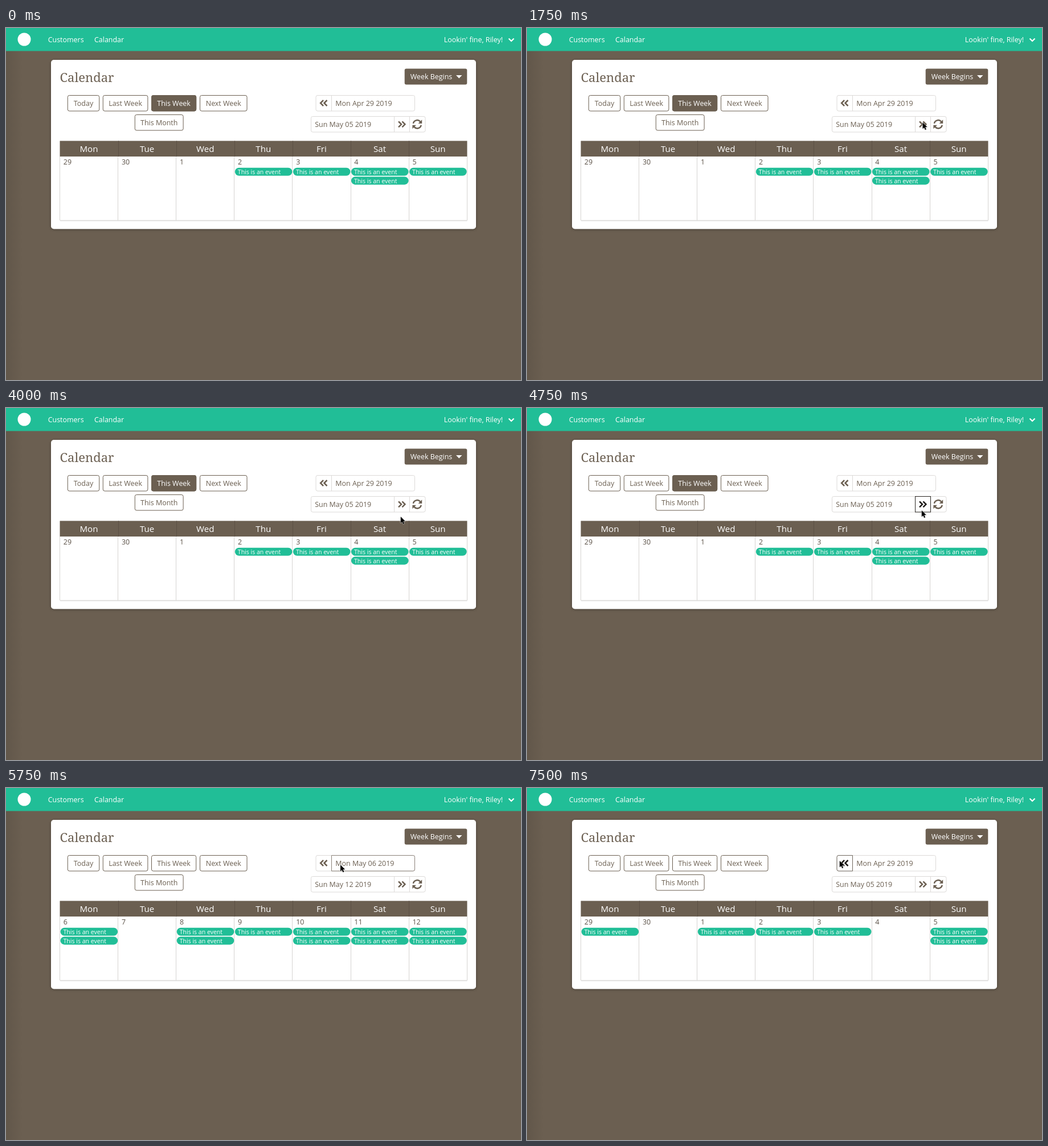
These frames come from a looping animation (904x619 px, 8 s). An HTML page:

```html
<!DOCTYPE html>
<html lang="en">
<head>
<meta charset="utf-8">
<title>Calendar</title>
<style>
  :root { --brown: #6b5f51; --teal: #21be97; }
  html, body { margin: 0; width: 904px; height: 619px; overflow: hidden; background: var(--brown); }
  svg { display: block; font: 12.45px "Open Sans", "Noto Sans", sans-serif; }
  .white { fill: #fff; }
  .ink { fill: var(--brown); }
  .mid { text-anchor: middle; }
  .title { font: 300 22px "Noto Serif", serif; }
  .head { font-size: 15.1px; }
  .event { font-size: 10.55px; fill: #fff; }
  .day { fill: #5b5147; }
  .button { fill: #fff; stroke: var(--brown); }
  .field { fill: #fff; stroke: #dcdad8; }
  .line { fill: none; stroke: #d6d4d2; }
  .icon { fill: none; stroke: var(--brown); stroke-width: 2.5; }
  .hover { fill: none; stroke: #8a8178; }
  .dark { fill: #fff; stroke: #6f675e; }
  .dark + .icon { stroke: #1d1a17; }
  .card { filter: drop-shadow(0 1px 2px rgba(0, 0, 0, .35)); }

  .anim { animation: 8s step-end infinite; opacity: 0; }
  #weekA { animation-name: first; }
  #weekB { animation-name: second; }
  #weekC { animation-name: third; }
  #nextHover { animation-name: nextHover; }
  #nextFocus { animation-name: nextFocus; }
  #inputHover { animation-name: inputHover; }
  #prevHover { animation-name: prevHover; }
  #cursor { animation-name: cursor; }
  #nextFocus .dark { stroke: #2a2622; }

  @keyframes first { 0% { opacity: 1 } 62.5%, 100% { opacity: 0 } }
  @keyframes second { 0% { opacity: 0 } 62.5% { opacity: 1 } 90.625%, 100% { opacity: 0 } }
  @keyframes third { 0% { opacity: 0 } 90.625%, 100% { opacity: 1 } }
  @keyframes nextHover {
    0%, 50% { opacity: 0 }
    46.875%, 53.125% { opacity: 1 }
    59.375%, 100% { opacity: 0 }
  }
  @keyframes nextFocus { 0% { opacity: 0 } 59.375% { opacity: 1 } 71.875%, 100% { opacity: 0 } }
  @keyframes inputHover { 0% { opacity: 0 } 71.875% { opacity: 1 } 75%, 100% { opacity: 0 } }
  @keyframes prevHover { 0% { opacity: 0 } 75%, 100% { opacity: 1 } }
  @keyframes cursor {
    0% { opacity: 0; transform: translate(783px, 47px) }
    6.25% { opacity: 1; transform: translate(783px, 47px) }
    9.375% { opacity: 1; transform: translate(799px, 139px) }
    12.5% { opacity: 1; transform: translate(842px, 141.5px) }
    15.625% { opacity: 1; transform: translate(802.5px, 141px) }
    18.75% { opacity: 1; transform: translate(722.5px, 151.5px) }
    21.875% { opacity: 1; transform: translate(694.5px, 166px) }
    25% { opacity: 1; transform: translate(693px, 170.5px) }
    46.875% { opacity: 1; transform: translate(692.7px, 184px) }
    50% { opacity: 1; transform: translate(692.7px, 191px) }
    53.125% { opacity: 1; transform: translate(692.7px, 181px) }
    56.25% { opacity: 1; transform: translate(692.7px, 180px) }
    71.875% { opacity: 1; transform: translate(587px, 135px) }
    75% { opacity: 1; transform: translate(555.5px, 132.5px) }
    78.125% { opacity: 1; transform: translate(555px, 132px) }
    81.25% { opacity: 1; transform: translate(553.5px, 131px) }
    84.375% { opacity: 1; transform: translate(552px, 130.5px) }
    87.5% { opacity: 1; transform: translate(551.5px, 130px) }
    90.625%, 100% { opacity: 1; transform: translate(548.7px, 128px) }
  }
</style>
</head>
<body>
<svg width="904" height="619" viewBox="0 0 904 619">
  <defs>
    <linearGradient id="edge">
      <stop offset="0" stop-opacity=".09"/>
      <stop offset="1" stop-opacity="0"/>
    </linearGradient>
    <path id="chevrons" d="M-5.5 -5l5 5l-5 5M.9 -5l5 5l-5 5"/>
  </defs>
  <rect width="904" height="619" class="ink"/>
  <rect width="30" height="619" fill="url(#edge)"/>

  <rect width="904" height="40.5" fill="var(--teal)"/>
  <circle cx="32" cy="20" r="11.5" class="white"/>
  <g class="white">
    <text x="73.7" y="25">Customers</text>
    <text x="155" y="25">Calandar</text>
    <text x="768.8" y="25">Lookin' fine, Riley!</text>
  </g>
  <path d="M882.5 18.5l4.5 4.5l4.5 -4.5" fill="none" stroke="#fff" stroke-width="2.2"/>

  <rect x="79" y="56" width="746" height="297.5" rx="5" class="white card"/>
  <text x="94.5" y="95" class="ink title">Calendar</text>
  <rect x="699.7" y="71.5" width="109.6" height="28" rx="3" class="ink"/>
  <text x="709.7" y="90" class="white">Week Begins</text>
  <path d="M790 83h10.5l-5.25 5.6z" class="white"/>

  <g id="buttons"></g>

  <g class="field">
    <rect x="544" y="118.5" width="173.5" height="27.5" rx="3"/>
    <path d="M571.5 118.5v27.5"/>
    <rect x="535.5" y="155.5" width="200.5" height="27.5" rx="3"/>
    <path d="M681.5 155.5v27.5M708.5 155.5v27.5"/>
  </g>
  <use href="#chevrons" class="icon" transform="translate(558 132) scale(-1 1)"/>
  <use href="#chevrons" class="icon" transform="translate(694.5 169.3)"/>
  <g transform="translate(721.8 169.3)">
    <path d="M-6.9 -1.4A7 7 0 0 1 5.4 -4.6M6.9 1.4A7 7 0 0 1 -5.4 4.6" class="icon"/>
    <path d="M8.4 -8v6.6h-6.6zM-8.4 8v-6.6h6.6z" class="ink"/>
  </g>

  <rect x="94.5" y="198.5" width="715" height="27.5" class="ink"/>
  <path d="M95 339.5h714.5" stroke="#000" stroke-opacity=".08"/>
  <g id="grid"></g>

  <g id="weekA" class="anim"></g>
  <g id="weekB" class="anim"></g>
  <g id="weekC" class="anim"></g>

  <g id="nextHover" class="anim">
    <rect x="681.5" y="155.5" width="27" height="27.5" class="dark"/>
    <use href="#chevrons" class="icon" transform="translate(694.5 169.3)"/>
  </g>
  <g id="nextFocus" class="anim">
    <rect x="681.5" y="155.5" width="27" height="27.5" class="dark"/>
    <use href="#chevrons" class="icon" transform="translate(694.5 169.3)"/>
  </g>
  <path id="inputHover" class="anim hover" d="M571.5 118.5h143a3 3 0 0 1 3 3v21.5a3 3 0 0 1 -3 3h-143z"/>
  <g id="prevHover" class="anim">
    <path d="M571.5 118.5v27.5h-24.5a3 3 0 0 1 -3 -3v-21.5a3 3 0 0 1 3 -3z" class="dark"/>
    <use href="#chevrons" class="icon" transform="translate(558 132) scale(-1 1)"/>
  </g>

  <path id="cursor" class="anim" d="M0 0v11.4l2.6 -2.4l1.8 4.2l2 -.9l-1.8 -4h3.6z"
        fill="#000" stroke="#fff" stroke-width=".9" paint-order="stroke"/>
</svg>
<script>
  const byId = id => document.getElementById(id);
  const colX = i => 94.5 + i * 102.1;
  const text = (x, y, cls, str) => `<text x="${x}" y="${y}" class="${cls}">${str}</text>`;

  function button(label, x, y, w, active) {
    const fill = active ? ' style="fill:var(--brown)"' : '';
    return `<rect x="${x}" y="${y}" width="${w}" height="27.5" rx="3" class="button"${fill}/>` +
      text(x + w / 2, y + 18.2, active ? 'white mid' : 'ink mid', label);
  }

  byId('buttons').innerHTML =
    button('Today', 108.3, 118.5, 55.4) +
    button('Last Week', 170.3, 118.5, 78.6) +
    button('This Week', 255.5, 118.5, 78.2) +
    button('Next Week', 340.5, 118.5, 82.5) +
    button('This Month', 226.3, 152.5, 84.8);

  const names = ['Mon', 'Tue', 'Wed', 'Thu', 'Fri', 'Sat', 'Sun'];
  byId('grid').innerHTML = names.map((name, i) =>
    text(colX(i) + 51, 218.3, 'white head mid', name) +
    (i ? `<path d="M${Math.round(colX(i)) + .5} 198.5v27.5" stroke="#5b5044"/>` : '') +
    `<path d="M${Math.floor(colX(i)) + .5} 226v112" class="line"/>`
  ).join('') + '<path d="M809.5 226v112.3H94.5" class="line"/>';

  // counts holds the number of events on each day
  function week(id, from, to, days, counts) {
    let out = text(578.3, 136.7, 'ink', from) + text(542.3, 174, 'ink', to);
    days.forEach((day, i) => {
      const x = colX(i);
      out += text(x + 6.3, 240, 'day', day);
      for (let n = 0; n < counts[i]; n++) {
        const y = 245.8 + n * 15.6;
        out += `<rect x="${x + 1}" y="${y}" width="100.6" height="14" rx="7" fill="var(--teal)"/>` +
          text(x + 6, y + 11.2, 'event', 'This is an event');
      }
    });
    byId(id).innerHTML += out;
  }

  const april = [29, 30, 1, 2, 3, 4, 5];
  byId('weekA').innerHTML = button('This Week', 255.5, 118.5, 78.2, true);
  week('weekA', 'Mon Apr 29 2019', 'Sun May 05 2019', april, [0, 0, 0, 1, 1, 2, 1]);
  week('weekB', 'Mon May 06 2019', 'Sun May 12 2019', [6, 7, 8, 9, 10, 11, 12], [2, 0, 2, 1, 2, 2, 2]);
  week('weekC', 'Mon Apr 29 2019', 'Sun May 05 2019', april, [1, 0, 1, 1, 1, 0, 2]);
</script>
</body>
</html>
```
